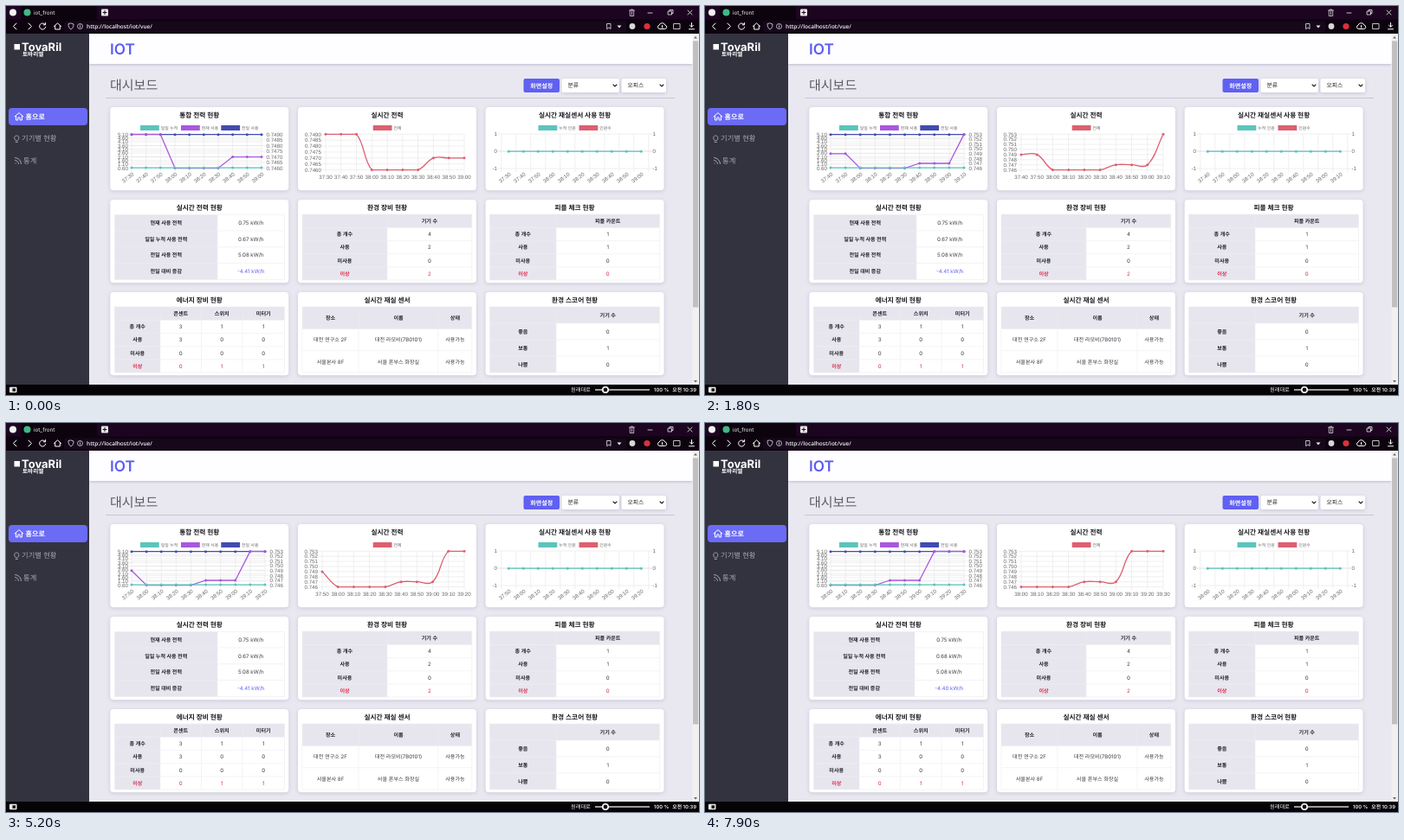
Animation, 800 px wide and 450 px high, one loop 8000 ms. Source, as an HTML page:

```html
<!DOCTYPE html>
<html lang="ko">
<head>
<meta charset="utf-8">
<title>iot_front</title>
<style>
  html, body { margin: 0; width: 100%; height: 100%; overflow: hidden; background: #e9e8f1; }
  svg { display: block; width: 800px; height: 450px; }
  text { font-family: Inter, "Noto Sans CJK KR", "Noto Sans CJK", sans-serif; text-rendering: geometricPrecision; white-space: pre; }
  .axis { font-family: "Liberation Sans", "Noto Sans CJK KR", sans-serif; }
  .url { font-family: "Open Sans", "Noto Sans CJK KR", sans-serif; }
  .card { fill: #fff; filter: drop-shadow(0 1px 2px rgba(60, 60, 100, .2)); }
</style>
</head>
<body>
<svg viewBox="0 0 800 450" xmlns="http://www.w3.org/2000/svg">
  <g id="page"></g>
  <g id="live"></g>
</svg>
<script>
const INK = '#2b2b33', SHADE = '#e7e6ee', RULE = '#ececf1', ACCENT = '#5d5df0', ALERT = '#dc2b4e';
const TEAL = '#5cc4bc', PURPLE = '#aa58de', BLUE = '#424bb0', RED = '#dc6070', GRID = '#e4e4e6';

// drawing helpers
const rect = (x, y, w, h, fill, r = 0, extra = '') =>
  `<rect x="${x}" y="${y}" width="${w}" height="${h}" rx="${r}" fill="${fill}" ${extra}/>`;
const line = (x1, y1, x2, y2, color, w = 0.6) =>
  `<path d="M${x1} ${y1}L${x2} ${y2}" stroke="${color}" stroke-width="${w}"/>`;
const stroke = (d, color = '#fff', w = 1) =>
  `<path d="${d}" fill="none" stroke="${color}" stroke-width="${w}" stroke-linecap="round" stroke-linejoin="round"/>`;
const dot = (x, y, r, fill) => `<circle cx="${x}" cy="${y}" r="${r}" fill="${fill}"/>`;

// y is the vertical middle of the glyphs
function label(x, y, str, size, { color = INK, weight = 400, anchor = 'middle', cls = '', turn = 0 } = {}) {
  const spin = turn ? `transform="rotate(${turn} ${x} ${y})"` : '';
  return `<text class="${cls}" x="${x}" y="${y + size * 0.36}" font-size="${size}" font-weight="${weight}" ` +
    `fill="${color}" text-anchor="${anchor}" ${spin}>${str}</text>`;
}

function browser() {
  const white = { color: '#f4f4f4', anchor: 'start' };
  return rect(0, 0, 800, 16, '#1d0521') + rect(0, 15.5, 800, 16.5, '#0d030f') + rect(17, 0, 88, 16, '#0d030f') +
    dot(8, 7.5, 4, '#f2f2f2') + dot(24.5, 7.5, 4, '#41b883') +
    label(32, 7.5, 'iot_front', 6.3, white) +
    rect(110, 3.5, 8, 8, '#e8e8e8', 1) + stroke('M114 5.5v4M112 7.5h4', '#1d0521') +
    // window controls
    stroke('M719.5 5h6M721.5 5v-1h2v1M720.3 5.5v6h4.4v-6M722.5 6.5v3.5', '#ddd', 0.8) +
    stroke('M741 8h5M764.5 6h4v4h-4zM766 6v-1.5h4v4h-1.5M787 5l5 5M792 5l-5 5', '#eee', 0.8) +
    // navigation
    stroke('M12 20l-3.5 3.5L12 27M26 20l3.500 3.500L26 27') +
    stroke('M45 21.2a3.600 3.600 0 1 0 .8 3M45.600 19.500v2.300h-2.300') +
    stroke('M55.500 23.500l4-3.700 4 3.700M56.700 23v4h5.600v-4') +
    rect(67, 17.5, 649, 12.5, '#16081a', 2) +
    stroke('M75 20l3 1c0 3-1 5-3 6-2-1-3-3-3-6z', '#ddd', 0.8) +
    '<circle cx="85.500" cy="23.500" r="3" fill="none" stroke="#ddd" stroke-width=".8"/>' +
    stroke('M85.500 23v2M85.500 21.800v.1', '#ddd', 0.8) +
    label(93, 23.5, 'http://localhost/iot/vue/', 6.5, { ...white, cls: 'url', weight: 600 }) +
    stroke('M694 20.500h4v6l-2-1.600-2 1.600z', '#eee', 0.8) + '<path d="M705.500 22.500h5l-2.500 3z" fill="#eee"/>' +
    dot(723, 23.5, 3.4, '#d7d7da') + dot(740, 23.5, 3.6, '#d8323c') +
    stroke('M754.500 26.500a2.200 2.200 0 0 1-.5-4.300 3.700 3.700 0 0 1 7 0 2.200 2.200 0 0 1 0 4.300zM757.500 22.500v2.500') +
    stroke('M771 20.500h7v6h-7z', '#eee', 0.8) +
    stroke('M791.500 19.500v4.500M789.500 22.200l2 2 2-2M788.500 26.800h6') +
    // status bar
    rect(0, 438, 800, 12, '#060306') + rect(4, 440.8, 8.5, 6.5, '#e9e9e9', 1) + rect(7.5, 442.3, 3.5, 3.5, '#111') +
    label(652, 444, '원래대로', 6.2, white) +
    line(680, 444, 743, 444, '#cfcfcf', 1.4) + dot(692, 444, 4, '#fff') + dot(692, 444, 2.4, '#111') +
    label(748, 444, '100 %', 5.8, { ...white, weight: 600 }) +
    label(797, 444, '오전 10:39', 5.8, { ...white, anchor: 'end', weight: 600 });
}

function sidebar() {
  const item = { color: '#a6a6b2', anchor: 'start' };
  return rect(0, 32, 96, 406, '#333340') +
    rect(9.5, 44, 6.5, 6.5, '#fff') +
    label(18, 47.5, 'TovaRil', 13, { color: '#fff', weight: 700, anchor: 'start' }) +
    label(19, 55.6, '토바리엘', 6.6, { color: '#fff', weight: 700, anchor: 'start' }) +
    rect(3, 118, 91, 20, '#6b6bf6', 4) +
    stroke('M10 128l5-4.400 5 4.400M11.500 127v5h2.300v-3h2.400v3h2.300v-5') +
    label(22.5, 128, '홈으로', 8.1, { color: '#fff', weight: 700, anchor: 'start' }) +
    stroke('M11 155.500c-2-2-1.800-5.500 1.300-5.500s3.300 3.500 1.300 5.500zM11.200 157.500h2.200', '#a6a6b2', 0.9) +
    label(18, 153.5, '기기별 현황', 8.3, item) +
    stroke('M10.500 175.500a7 7 0 0 1 7 7M10.500 178.500a4 4 0 0 1 4 4M11 182h.1', '#a6a6b2', 1) +
    label(20, 179.5, '통계', 8.3, item);
}

function header() {
  const pick = (x, w, str) => rect(x, 84, w, 16, '#fff', 2, 'class="card"') +
    label(x + 7, 92, str, 6.8, { anchor: 'start', color: '#222' }) +
    stroke(`M${x + w - 7} 91l2 2 2-2`, '#222', 1.1);
  return rect(96, 32, 697, 406, '#e9e8f1') +
    rect(96, 32, 697, 35, '#fefdff', 0, 'style="filter:drop-shadow(0 1px 1.500px rgba(60,60,100,.25))"') +
    label(120, 49.7, 'IOT', 17.3, { color: ACCENT, weight: 600, anchor: 'start' }) +
    label(120, 91.5, '대시보드', 15, { color: '#5b5b63', weight: 500, anchor: 'start' }) +
    line(115, 106.5, 772, 106.5, '#c8c7d2', 1) +
    rect(597.5, 84, 41.5, 16, '#6060f2', 2) +
    label(618.2, 92, '화면설정', 7, { color: '#fff', weight: 700 }) +
    pick(641.5, 66.5, '분류') + pick(710.5, 51.5, '오피스') +
    rect(792.5, 32, 7.5, 406, '#f1f1f1') + rect(793, 40.5, 6.2, 308, '#c0c0c2') +
    '<path d="M794 37.500h4l-2-2.500zM794 433h4l-2 2.500z" fill="#666"/>';
}

const COLS = [120.3, 337, 553.6], ROWS = [117, 224, 331];
const TITLES = [
  ['통합 전력 현황', '실시간 전력', '실시간 재실센서 사용 현황'],
  ['실시간 전력 현황', '환경 장비 현황', '피플 체크 현황'],
  ['에너지 장비 현황', '실시간 재실 센서', '환경 스코어 현황']
];
const cards = () => ROWS.map((y, r) => COLS.map((x, c) =>
  rect(x, y, 206, 96.3, '#fff', 4, 'class="card"') +
  label(x + 103, y + 9.6, TITLES[r][c], 7.7, { weight: 700, color: '#1c1c22' })).join('')).join('');

// xs: column edges, ys: row edges, rows: cell texts
function table(xs, ys, rows, { head = true, side = true, style } = {}) {
  const left = xs[0], right = xs[xs.length - 1], top = ys[0], bottom = ys[ys.length - 1];
  let out = '';
  if (side) out += rect(left, top, xs[1] - left, bottom - top, SHADE);
  if (head) out += rect(left, top, right - left, ys[1] - top, SHADE);
  for (const y of ys) out += line(left, y, right, y, RULE);
  for (const x of xs) out += line(x, top, x, bottom, RULE);
  rows.forEach((row, r) => row.forEach((cell, c) => {
    const strong = (head && r === 0) || (side && c === 0);
    const look = { weight: strong ? 700 : 400, color: strong ? '#22222a' : '#3c3c44' };
    if (row[0] === '이상') look.color = ALERT;
    out += label((xs[c] + xs[c + 1]) / 2, (ys[r] + ys[r + 1]) / 2, cell, 6.1, { ...look, ...(style && style(r, c)) });
  }));
  return out;
}

const STATES = ['총 개수', '사용', '미사용', '이상'];
const states = (head, cols) => [['', ...head], ...STATES.map((s, i) => [s, ...cols.map(c => c[i])])];

const tables = () =>
  table([342, 440, 537.8], [241, 256.4, 271.6, 286.8, 302, 317], states(['기기 수'], ['4202'])) +
  table([558.5, 635, 754.5], [241, 256.4, 271.6, 286.8, 302, 317], states(['피플 카운트'], ['1100'])) +
  table([125.5, 178, 225.5, 273, 321.5], [348, 363.3, 378.6, 393.8, 409, 424],
    states(['콘센트', '스위치', '미터기'], ['3300', '1001', '1001'])) +
  table([342, 407, 499, 537.8], [348, 373.5, 398.7, 424],
    [['장소', '이름', '상태'], ['대전 연구소 2F', '대전 라모비(7B0101)', '사용가능'],
      ['서울본사 8F', '서울 폰부스 화장실', '사용가능']], { side: false }) +
  table([558.5, 635, 754.5], [348, 367, 386, 405, 424],
    [['', '기기 수'], ['좋음', '0'], ['보통', '1'], ['나쁨', '0']]);

const power = late => table([125.5, late ? 242 : 244, 321.5], [241.5, 260, 278.7, 297.5, 316.5],
  [['현재 사용 전력', '0.75 kW/h'], ['일일 누적 사용 전력', late ? '0.68 kW/h' : '0.67 kW/h'],
    ['전일 사용 전력', '5.08 kW/h'], ['전일 대비 증감', late ? '-4.40 kW/h' : '-4.41 kW/h']],
  { head: false, style: (r, c) => r === 3 && c === 1 ? { color: ACCENT } : null });

const key = (x, str, color) => rect(x, 138, 21.8, 6, color) +
  label(x + 23.8, 141, str, 4.9, { cls: 'axis', color: '#666', anchor: 'start' });
const legends = () => key(155, '일일 누적', TEAL) + key(202, '현재 사용', PURPLE) + key(248.3, '전일 사용', BLUE) +
  key(423.7, '전체', RED) + key(614.5, '누적 인원', TEAL) + key(661.5, '인원수', RED);

// readings in thousandths of kW, one every ten seconds from 37:30
const POWER = [749, 749, 749, 746, 746, 746, 746, 747, 747, 747, 753, 753, 753];
const COUNT = 10, TICKS = [...Array(COUNT).keys()];
const UPDATES = [612, 3932, 7250], EASE_MS = 333, LOOP = 8000, STEP = 100;

const clock = i => {
  const s = 37 * 60 + 30 + i * 10;
  return `${Math.floor(s / 60)}:${String(s % 60).padStart(2, '0')}`;
};
const easeOutQuart = p => 1 - (1 - p) ** 4;
const mix = (a, b, p) => a + (b - a) * p;
const clamp = (v, lo, hi) => Math.min(hi, Math.max(lo, v));

// axis range and plot areas after k updates
const range = k => k ? { max: 753, step: 1, n: 8, digits: 3 } : { max: 749, step: 0.5, n: 7, digits: 4 };
const areas = k => ({
  mixed: { l: 145, r: k ? 299 : 295, t: 148.4, b: 187.6 },
  single: { l: k ? 365 : 369, r: 529, t: 148.3, b: 189.6 }
});
const spread = (a, i) => mix(a.l, a.r, i / (COUNT - 1));
const points = (a, k) => TICKS.map(i => ({
  x: spread(a, i), y: mix(a.b, a.t, (POWER[i + k] - 746) / (range(k).max - 746))
}));
const flat = (a, y) => TICKS.map(i => ({ x: spread(a, i), y }));
const blend = (from, to, p) => to.map((q, i) => ({ x: mix(from[i].x, q.x, p), y: mix(from[i].y, q.y, p) }));

function curve(pts, a, tension) {
  const ctrl = pts.map((c, i) => {
    const p = pts[i - 1] || c, n = pts[i + 1] || c;
    const d1 = Math.hypot(c.x - p.x, c.y - p.y), d2 = Math.hypot(n.x - c.x, n.y - c.y);
    const at = f => `${clamp(c.x + f * (n.x - p.x), a.l, a.r)} ${clamp(c.y + f * (n.y - p.y), a.t, a.b)}`;
    return { before: at(-tension * d1 / (d1 + d2)), after: at(tension * d2 / (d1 + d2)) };
  });
  return pts.map((c, i) => i ? `C${ctrl[i - 1].after} ${ctrl[i].before} ${c.x} ${c.y}` : `M${c.x} ${c.y}`).join('');
}
const series = (pts, a, color, tension = 0) => stroke(curve(pts, a, tension), color, 1.3) +
  pts.map(p => dot(p.x, p.y, 1.5, color)).join('');

const axisText = (x, y, str, anchor, turn) => label(x, y, str, 6.2, { cls: 'axis', color: '#666', anchor, turn });
const slanted = (x, k, i) => axisText(x + 1.5, 193.7, clock(i + k), 'end', -38);

function scale(a, k, x, anchor, ticks) {
  const { max, step, n, digits } = range(k);
  return [...Array(n).keys()].map(i => {
    const y = mix(a.t, a.b, i / (n - 1));
    return line(a.l - ticks, y, a.r + 4 - ticks, y, GRID) +
      axisText(x, y, ((max - i * step) / 1000).toFixed(digits), anchor);
  }).join('');
}
const columns = a => TICKS.map(i => line(spread(a, i), a.t, spread(a, i), a.b + 4, GRID)).join('');

function mixedChart(k, p) {
  const a = areas(k).mixed, was = Math.max(0, k - 1), old = areas(was).mixed;
  const move = (f, t) => blend(f, t, p);
  let out = columns(a) + scale(a, k, a.r + 5.5, 'start', 0);
  for (let i = 0; i < 10; i++) {
    const y = mix(a.t, a.b, i / 9);
    out += line(a.l - 4, y, a.r, y, GRID) + axisText(a.l - 4, y, (5.1 - i * 0.5).toFixed(2), 'end');
  }
  out += TICKS.map(i => slanted(spread(a, i), k, i)).join('');
  return out + series(move(flat(old, 148.7), flat(a, 148.7)), a, BLUE) +
    series(move(points(old, was), points(a, k)), a, PURPLE) +
    series(move(flat(old, 187.1), flat(a, 187.1)), a, TEAL);
}

function singleChart(k, p) {
  const a = areas(k).single, was = Math.max(0, k - 1);
  return columns(a) + scale(a, k, a.l - 5, 'end', 4) +
    TICKS.map(i => axisText(spread(a, i), 197.5, clock(i + k), 'middle')).join('') +
    series(blend(points(areas(was).single, was), points(a, k), p), a, RED, 0.4);
}

function sensorChart(k) {
  const a = { l: 580.3, r: 733.3, t: 148, b: 188 };
  let out = '';
  for (let i = 0; i <= COUNT; i++) out += line(571.8 + 17 * i, a.t, 571.8 + 17 * i, a.b + 4, GRID);
  [1, 0, -1].forEach((v, i) => {
    const y = 148 + 20 * i;
    out += line(568, y, 746, y, v ? GRID : '#cfcfd2') +
      axisText(567, y, v, 'end') + axisText(746.5, y, v, 'start');
  });
  return out + TICKS.map(i => slanted(spread(a, i), k, i)).join('') + series(flat(a, 168.2), a, TEAL);
}

function render(t) {
  const k = UPDATES.filter(u => t >= u).length;
  const p = k ? easeOutQuart(Math.min(1, (t - UPDATES[k - 1]) / EASE_MS)) : 1;
  live.innerHTML = mixedChart(k, p) + singleChart(k, p) + sensorChart(k) + power(k === 3);
}

const live = document.getElementById('live');
document.getElementById('page').innerHTML = header() + sidebar() + browser() + cards() + legends() + tables();

let start = null, shown = -1;
function tick(now) {
  if (start === null) start = now;
  const t = Math.floor(((now - start) % LOOP) / STEP) * STEP;
  if (t !== shown) render(shown = t);
  requestAnimationFrame(tick);
}
render(0);
requestAnimationFrame(tick);
</script>
</body>
</html>
```
